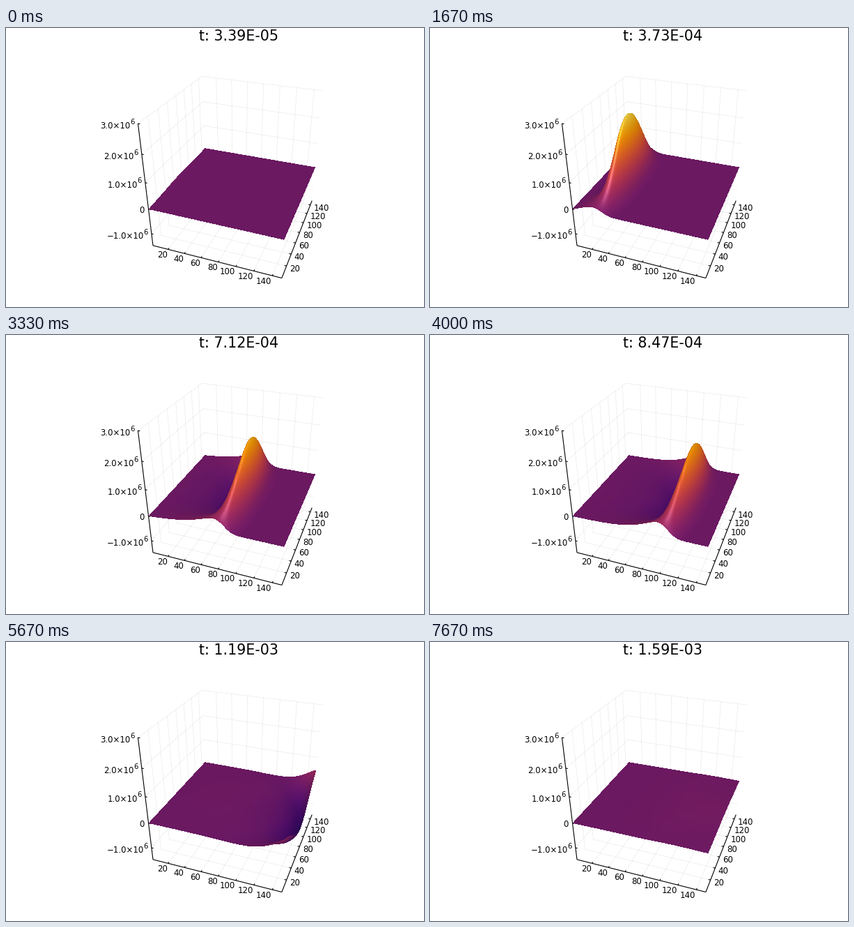
These frames come from a looping animation (600x400 px, 8000 ms). A matplotlib script:

```python
import numpy as np
import matplotlib.pyplot as plt
from matplotlib.animation import FuncAnimation

WIDTH, HEIGHT, DPI = 600, 400, 100
FRAMES, INTERVAL_MS = 160, 50
STATE_COUNT = 24              # wave states shown during one loop
N = 150                       # grid points per side
Z_MIN, Z_MAX = -1.5e6, 3.0e6
HALF_STEP = 3.389e-5          # seconds in half a state

# Camera orbiting the cube [-1, 1]^3
AZIMUTH, ELEVATION = np.radians(20), np.radians(30)
DISTANCE = np.sqrt(3) / np.sin(np.radians(15))
CENTER_X, CENTER_Y, SCALE = 333.3, 200.7, 637
SIN_A, COS_A = np.sin(AZIMUTH), np.cos(AZIMUTH)
SIN_E, COS_E = np.sin(ELEVATION), np.cos(ELEVATION)


def project(x, y, z):
    """Cube coordinates to stage pixels."""
    right = COS_A * x + SIN_A * y
    up = SIN_E * (COS_A * y - SIN_A * x) + COS_E * z
    depth = DISTANCE - COS_E * (SIN_A * x - COS_A * y) - SIN_E * z
    return CENTER_X + SCALE * right / depth, CENTER_Y - SCALE * up / depth


def unit_index(i):
    return 2 * (i - 1) / (N - 1) - 1


def unit_height(value):
    return 2 * (value - Z_MIN) / (Z_MAX - Z_MIN) - 1


def simulate():
    """2D wave driven along x = 1, first-order absorbing on the other sides."""
    steps, speed = 20, 10.55              # steps per state, cells per state
    courant = speed / steps
    k = (courant - 1) / (courant + 1)
    peak, t0, sigma = 2.88e6, 2.25, 0.64  # pulse, times in states
    profile = np.sin(np.pi * np.arange(N) / (N - 1)) ** 2
    old, now = np.zeros((N, N)), np.zeros((N, N))
    states = []
    for step in range(1, steps * STATE_COUNT):
        new = np.zeros((N, N))
        mid = now[1:-1, 1:-1]
        laplace = (now[2:, 1:-1] + now[:-2, 1:-1] + now[1:-1, 2:]
                   + now[1:-1, :-2] - 4 * mid)
        new[1:-1, 1:-1] = 2 * mid - old[1:-1, 1:-1] + courant**2 * laplace
        new[:, -1] = now[:, -2] + k * (new[:, -2] - now[:, -1])
        new[0] = now[1] + k * (new[1] - now[0])
        new[-1] = now[-2] + k * (new[-2] - now[-1])
        pulse = np.exp(-0.5 * ((step / steps - t0) / sigma) ** 2)
        new[:, 0] = peak * pulse * profile
        old, now = now, new
        if step % steps == steps // 2:
            states.append(now)
    return states


INFERNO = plt.get_cmap("inferno")


def shade(z):
    """Height colours lit from the camera."""
    slope_y, slope_x = np.gradient(z, 2 / (N - 1))
    facing = COS_E * (-SIN_A * slope_x + COS_A * slope_y) + SIN_E
    facing = np.clip(facing / np.sqrt(1 + slope_x**2 + slope_y**2), 0, 1)
    shine = 0.3 * np.clip(2 * facing**2 - 1, 0, 1) ** 6
    rgb = INFERNO((z + 1) / 2)[..., :3]
    return np.clip(rgb * (0.77 + 0.23 * facing)[..., None] + shine[..., None], 0, 1)


def resampler(axis):
    """Matrix for linear interpolation from the grid to the given positions."""
    grid_axis = np.linspace(-1, 1, N)
    return np.array([np.interp(axis, grid_axis, row) for row in np.eye(N)]).T


# Dense samples run back to front so nearer points overwrite;
# the inset makes up for points filling whole pixels at the rim
INSET = 0.993
fine_x = np.linspace(-INSET, INSET, 8 * N)
fine_y = np.linspace(INSET, -INSET, 4 * N)
FINE_X, FINE_Y = np.meshgrid(fine_x, fine_y)
ALONG_X, ALONG_Y = resampler(fine_x).T, resampler(fine_y)


def render(state):
    z = unit_height(state)
    colors = shade(z)
    px, py = project(FINE_X, FINE_Y, ALONG_Y @ z @ ALONG_X)
    cols = np.clip(px.astype(int), 0, WIDTH - 1).ravel()
    rows = np.clip(py.astype(int), 0, HEIGHT - 1).ravel()
    fine = np.stack([ALONG_Y @ colors[..., c] @ ALONG_X for c in range(3)], -1)
    image = np.zeros((HEIGHT, WIDTH, 4), np.uint8)
    image[rows, cols, :3] = (255 * fine + 0.5).astype(np.uint8).reshape(-1, 3)
    image[rows, cols, 3] = 255
    return image


plt.rcParams["font.family"] = "DejaVu Sans"
fig = plt.figure(figsize=(WIDTH / DPI, HEIGHT / DPI), dpi=DPI, facecolor="white")
ax = fig.add_axes([0, 0, 1, 1])


def segment(start, end, **style):
    (x0, y0), (x1, y1) = project(*start), project(*end)
    ax.plot([x0, x1], [y0, y1], **style)


def label(x, y, text, align, px=11.8):
    ax.text(x, y, text, fontsize=px * 72 / DPI, ha=align, va="baseline")


GRID = dict(color="black", alpha=0.09, lw=0.45, zorder=1)
AXIS = dict(color="black", lw=0.8, zorder=2, solid_capstyle="butt")
TICK = 0.03

segment((-1, -1, -1), (1, -1, -1), **AXIS)
segment((1, -1, -1), (1, 1, -1), **AXIS)
segment((-1, -1, -1), (-1, -1, 1), **AXIS)

for tick in range(20, 141, 20):
    u = unit_index(tick)
    segment((u, -1, -1), (u, 1, -1), **GRID)
    segment((u, 1, -1), (u, 1, 1), **GRID)
    segment((-1, u, -1), (1, u, -1), **GRID)
    segment((-1, u, -1), (-1, u, 1), **GRID)
    segment((u, -1, -1), (u, -1 + TICK, -1), **AXIS)
    segment((1, u, -1), (1 - TICK, u, -1), **AXIS)
    x, y = project(u, -1, -1)
    label(x - 1, y + 11.5, str(tick), "right")
    x, y = project(1, u, -1)
    label(x + 4.5, y + 8.2, str(tick), "left")

for million in range(-1, 4):
    h = unit_height(million * 1e6)
    segment((-1, -1, h), (-1, 1, h), **GRID)
    segment((-1, 1, h), (1, 1, h), **GRID)
    segment((-1, -1, h), (-1 + TICK, -1, h), **AXIS)
    x, y = project(-1, -1, h)
    if million == 0:
        label(x - 5.5, y + 4.8, "0", "right")
    else:
        mantissa = f"{million:.1f}×10".replace("-", "−")
        label(x - 11, y + 7, mantissa, "right")
        label(x - 4.8, y + 0.6, "6", "right", 10)

title = ax.text(333.7, 18.5, "", fontsize=20.7 * 72 / DPI, ha="center", va="baseline")
surface = ax.imshow(np.zeros((HEIGHT, WIDTH, 4), np.uint8), aspect="auto",
                    extent=(0, WIDTH, HEIGHT, 0), interpolation="nearest", zorder=3)
ax.set_xlim(0, WIDTH)
ax.set_ylim(HEIGHT, 0)
ax.axis("off")

IMAGES = [render(state) for state in simulate()]


def update(n):
    # States change on the 50 ms tick just before each third of a second
    index = (3 * n + 2) // 20
    title.set_text(f"t: {(2 * index + 1) * HALF_STEP:.2E}")
    surface.set_data(IMAGES[index])
    return title, surface


animation = FuncAnimation(fig, update, frames=FRAMES, interval=INTERVAL_MS,
                          repeat=True, repeat_delay=0)
plt.show()
```
